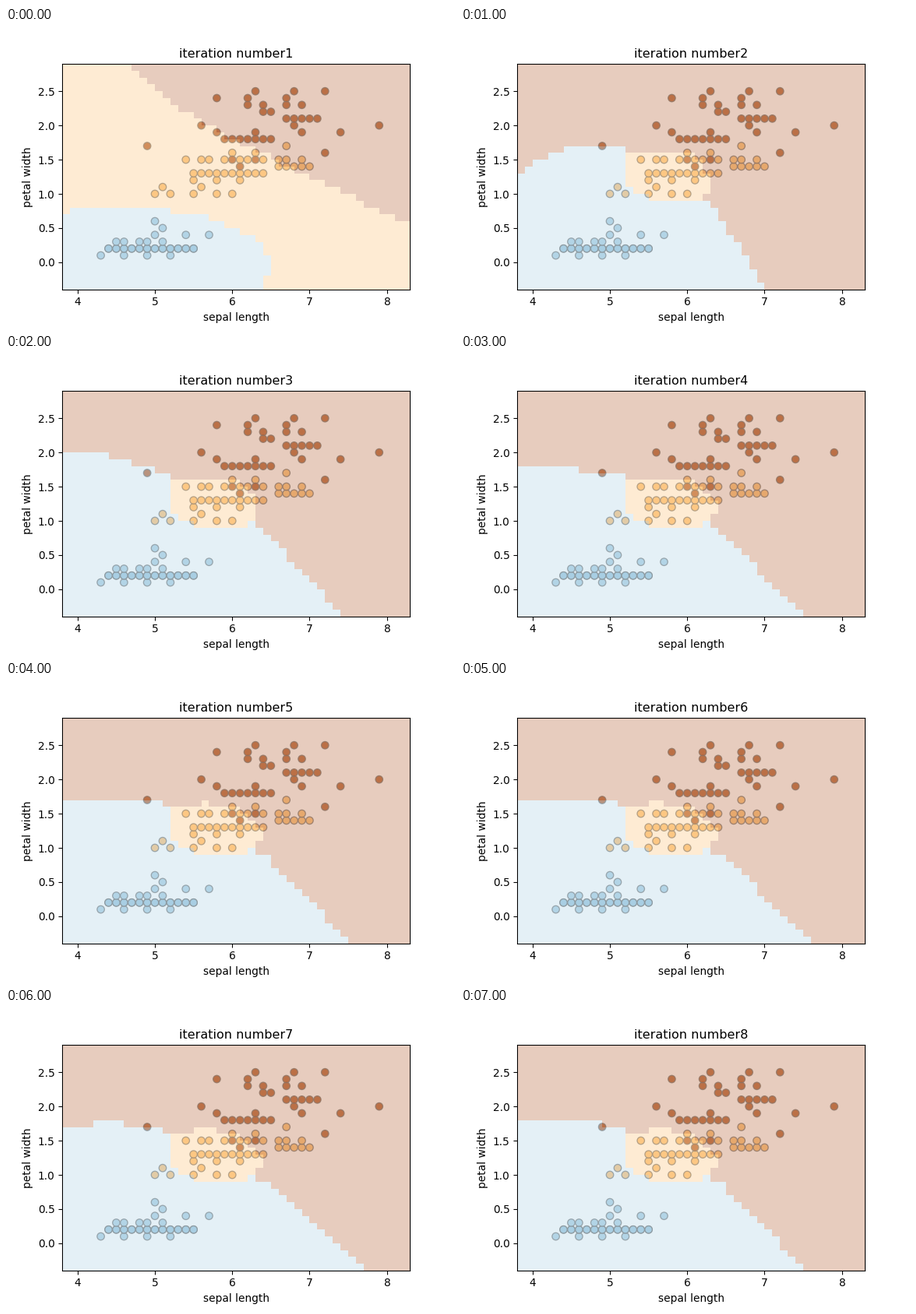
These frames come from a looping animation (576x384 px, 8 s). A matplotlib script:

```python
import numpy as np
import matplotlib.pyplot as plt
from matplotlib.animation import FuncAnimation
from matplotlib.path import Path

BLUE, ORANGE, BROWN = range(3)
COLS, ROWS = 45, 33
X0, X1, Y0, Y1 = 3.8, 8.3, -0.4, 2.9

# species: lowest petal width, then one (first, last, count) span of
# sepal lengths for each further 0.1 of width
SPECIES = [
    (0.1, [(4.3, 5.2, 4), (4.4, 5.5, 24), (4.5, 5.1, 5), (5.0, 5.7, 3),
           (5.1, 5.1, 1), (5.0, 5.0, 1)]),
    (1.0, [(5.0, 6.0, 5), (5.1, 5.6, 2), (5.5, 6.1, 3), (5.5, 6.4, 10),
           (6.6, 7.0, 5), (5.4, 6.9, 10), (6.0, 6.3, 2), (6.7, 6.7, 1)]),
    (1.4, [(6.1, 6.1, 1), (6.0, 6.3, 2), (7.2, 7.2, 1), (4.9, 4.9, 1),
           (5.9, 6.5, 7), (5.8, 7.4, 4), (5.6, 7.9, 3), (6.7, 7.1, 5),
           (6.4, 6.5, 2), (6.2, 6.9, 4), (5.8, 6.7, 3), (6.3, 7.2, 3)]),
]

# iterations 2 to 8: height of the blue area at its left, middle and right,
# and the column where its slanted side meets the bottom
SHAPES = [
    (1.30, 1.72, 1.70, 32),
    (2.05, 1.94, 1.67, 36),
    (1.83, 1.77, 1.66, 36.5),
    (1.70, 1.70, 1.64, 37),
    (1.72, 1.72, 1.64, 38),
    (1.72, 1.77, 1.64, 39),
    (1.80, 1.81, 1.71, 37),
]

cols, rows = np.meshgrid(np.arange(COLS) + 0.5, np.arange(ROWS) + 0.5)
centres = np.column_stack([cols.ravel(), rows.ravel()])


def fill(grid, label, corners):
    """Label every cell whose centre lies in the polygon (column, row)."""
    grid[Path(corners).contains_points(centres).reshape(grid.shape)] = label


def first_grid():
    grid = np.full((ROWS, COLS), ORANGE)
    fill(grid, BROWN, [(8.5, 0), (14, 5.5), (21, 10.5), (43, 22.5), (43, 23),
                       (COLS, 23), (COLS, 0)])
    fill(grid, BLUE, [(0, 22.2), (1, 21), (12, 21), (19, 22.5), (25, 25.5),
                      (27.2, 29.5), (25.8, ROWS), (0, ROWS)])
    return grid


def later_grid(iteration, left, middle, right, foot):
    grid = np.full((ROWS, COLS), BROWN)
    cap = [(x, 10 * (Y1 - y)) for x, y in ((0, left), (7, middle), (14, right))]
    shoulder = 25 + 0.3 * (foot - 32)
    fill(grid, BLUE, cap + [(14, 18), (24, 19), (shoulder, 20.5),
                            (foot, 32.5), (foot, ROWS), (0, ROWS)])
    # the orange island widens and grows a peak with each iteration
    reach = min(26, 24.5 + 0.3 * iteration)
    peak = 13 - 0.11 * iteration
    fill(grid, ORANGE, [(14, 13), (18.5, peak), (22.5, 13), (reach, 16.4),
                        (reach, 17.5), (23.6, 20), (18, 20), (14, 18)])
    return grid


grids = [first_grid()]
grids += [later_grid(i, *shape) for i, shape in enumerate(SHAPES, 2)]

plt.rcParams["font.size"] = 10.3
fig, ax = plt.subplots(figsize=(6, 4), dpi=96)
fig.subplots_adjust(left=0.125, right=0.9, bottom=0.125, top=0.88)

points = [(x, base + 0.1 * step, label)
          for label, (base, spans) in enumerate(SPECIES)
          for step, span in enumerate(spans)
          for x in np.linspace(*span).round(1)]
lengths, widths, labels = zip(*points)
ax.scatter(lengths, widths, c=labels, s=50, cmap="Paired", edgecolors="gray", alpha=0.8)

# the thin cell edges overlap and show up as a grid
mesh = ax.pcolormesh(np.linspace(X0, X1, COLS + 1), np.linspace(Y1, Y0, ROWS + 1),
                     grids[0], cmap="Paired", vmin=0, vmax=2, alpha=0.3,
                     antialiased=True, linewidth=0.41)
ax.set(xlim=(X0, X1), ylim=(Y0, Y1), xlabel="sepal length", ylabel="petal width")
ax.set_xticks(range(4, 9))
title = ax.set_title("", fontsize=12)


def update(i):
    mesh.set_array(grids[i])
    title.set_text(f"iteration number{i + 1}")
    return mesh, title


anim = FuncAnimation(fig, update, frames=len(grids), interval=1000, repeat=True)
plt.show()
```
